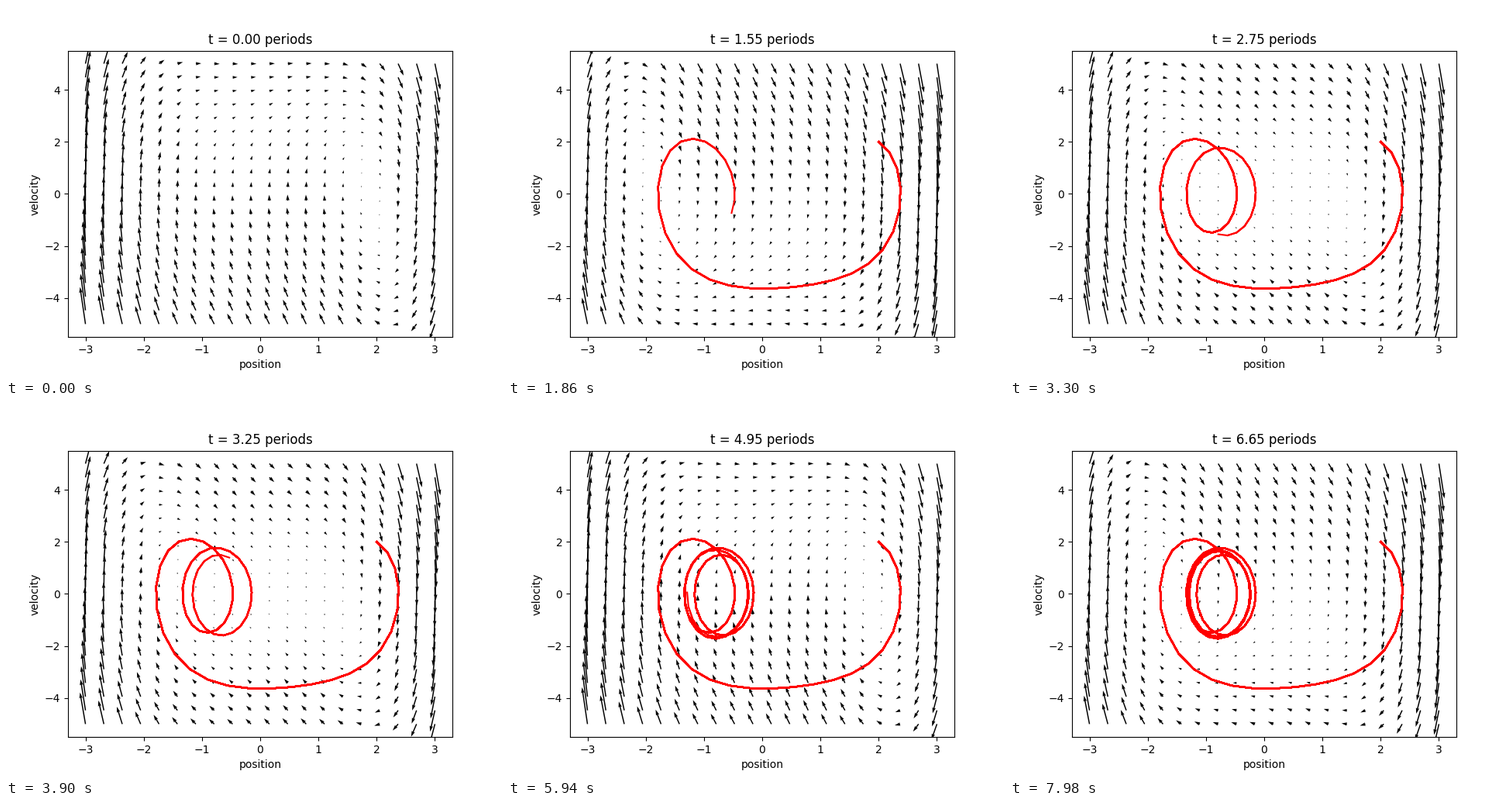
These frames come from a looping animation (640 by 480 pixels, 8 s). A matplotlib script:

```python
import math

import matplotlib.pyplot as plt
import numpy as np
from matplotlib.animation import FuncAnimation

# Driven, damped double-well oscillator: x'' = x - x^3 - DAMP x' + DRIVE cos(OMEGA t)
DAMP, DRIVE, OMEGA = 1.0, 5.0, math.pi
STEPS = 20           # plotted points per drive period
POINTS = 134
TICK, HOLD = 20, 3   # ms per frame, frames per plotted point
OVERLAP = 40         # repeated strokes that thicken the older trail


def accel(x, v, t):
    return x - x**3 - DAMP * v + DRIVE * np.cos(OMEGA * t)


def flow(state, t):
    x, v = state
    return np.array([v, accel(x, v, t)])


def trajectory(start, sub=10):
    h = 2 * math.pi / OMEGA / STEPS / sub
    s, t = np.array(start, float), 0.0
    path = [s]
    for _ in range(POINTS - 1):
        for _ in range(sub):
            k1 = flow(s, t)
            k2 = flow(s + h / 2 * k1, t + h / 2)
            k3 = flow(s + h / 2 * k2, t + h / 2)
            k4 = flow(s + h * k3, t + h)
            s = s + h / 6 * (k1 + 2 * k2 + 2 * k3 + k4)
            t += h
        path.append(s)
    return np.array(path)


path = trajectory((2, 2))
X, V = np.meshgrid(np.linspace(-3, 3, 20), np.linspace(-5, 5, 20))
A = accel(X, V, 0)

fig, ax = plt.subplots(figsize=(6.4, 4.8), dpi=100)
field = ax.quiver(X, V, V, A, scale=1.8 * 20 * np.hypot(V, A).mean())
trails = [ax.plot([], [], "r", lw=1.5)[0] for _ in range(OVERLAP)]
ax.set_xlim(-3.3, 3.3)
ax.set_ylim(-5.5, 5.5)
ax.set_xlabel("position")
ax.set_ylabel("velocity")
title = ax.set_title("t = 0.00 periods")


def update(frame):
    n = frame // HOLD
    periods = n / STEPS
    field.set_UVC(V, accel(X, V, periods * 2 * math.pi / OMEGA))
    for lag, line in enumerate(trails):
        end = n - lag
        line.set_visible(end > 0)
        if end > 0:
            line.set_data(path[:end + 1, 0], path[:end + 1, 1])
    title.set_text(f"t = {periods:.2f} periods")
    return [field, title, *trails]


anim = FuncAnimation(fig, update, frames=400, interval=TICK,
                     init_func=lambda: update(0), repeat=True, repeat_delay=0)
plt.show()
```
